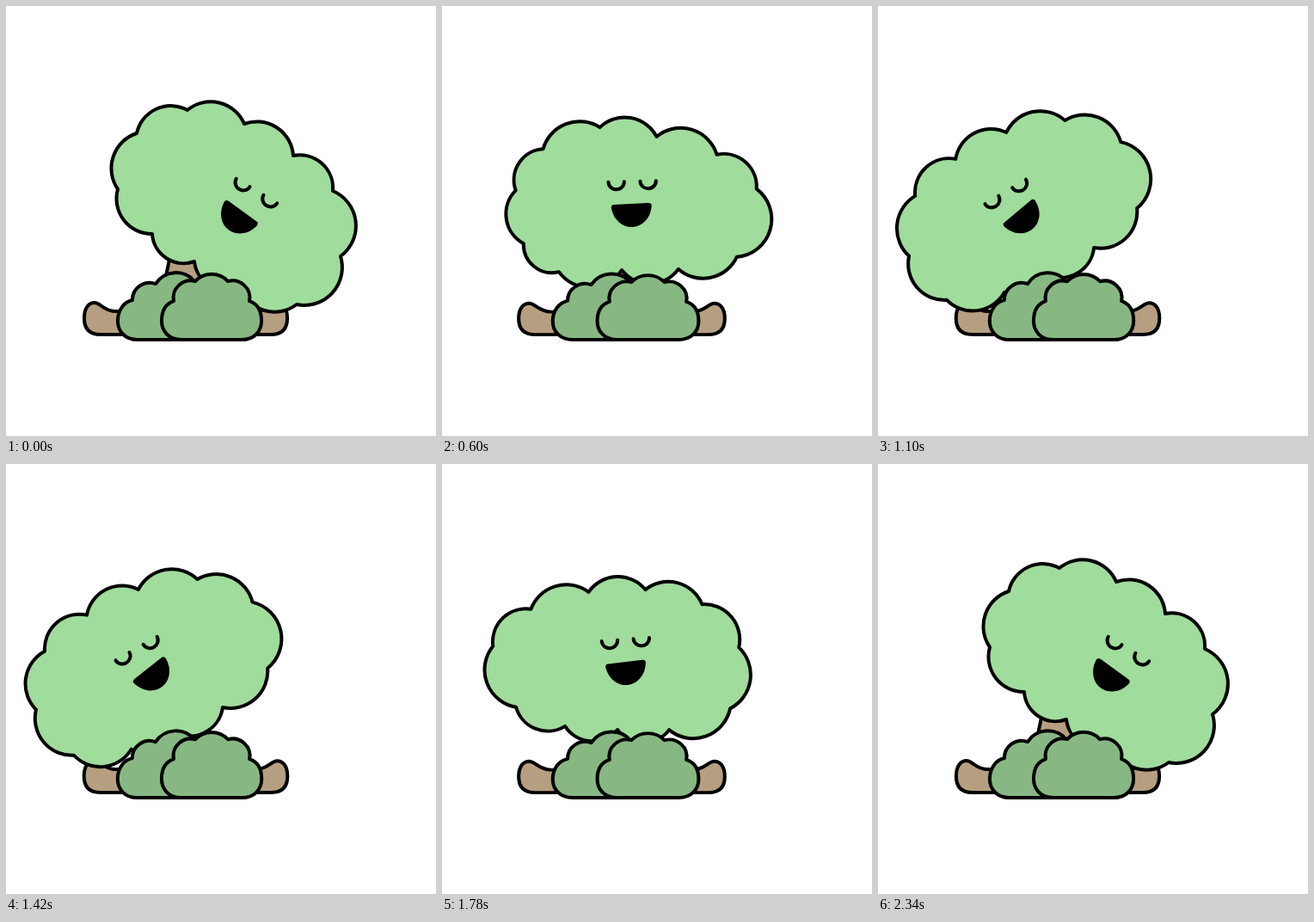
Recreate the animation shown at these times as an HTML page. Size 500 by 500 pixels, loop 2.36 s.

```html
<!DOCTYPE html>
<html lang="en">
<head>
<meta charset="utf-8">
<title>Swaying tree</title>
<style>
  html, body { margin: 0; width: 100%; height: 100%; overflow: hidden; background: #fff; }
  svg { display: block; width: 100%; height: 100%; }
  .line { stroke: #000; stroke-width: 4; stroke-linejoin: round; stroke-linecap: round; }
  .wood { fill: #b59f80; }
  .crown { fill: #a0dc9c; }
  .bush { fill: #87b883; }
  .eyes { fill: none; }
  .mouth { stroke: #000; stroke-width: 7; stroke-linejoin: round; }
</style>
</head>
<body>
<svg viewBox="0 0 500 500">
  <g class="squash">
    <path class="line wood" d="M209 382H110C97 382 91 375 91 363C91 350 97 345 103 345C110 345 114 355 128 355H165C181 352 184 330 186 314L192 285H226L232 314C234 330 237 352 253 355H290C304 355 308 345 315 345C321 345 327 350 327 363C327 375 321 382 308 382Z"/>
  </g>
  <path class="line crown" id="crown"/>
  <path class="line eyes" id="eyes" d="M-27.7 0A9.2 8.8 0 0 0-9.3 0M9.3 0A9.2 8.8 0 0 0 27.7 0"/>
  <path class="mouth" id="mouth" d="M-20-10H20C18 3 9 10 0 10S-18 3-20-10Z"/>
  <g class="squash">
    <path class="line bush" d="M153 388C138 388 130 378 130 366C130 354 137 344 147 342A20 20 0 0 1 174 323A28 28 0 0 1 219 320L240 388Z"/>
    <path class="line bush" d="M204 388H274C289 388 297 378 297 366C297 354 292 346 283 343A20 20 0 0 0 258 320A26 26 0 0 0 220 320A20 20 0 0 0 195 343C186 346 181 354 181 366C181 378 189 388 204 388Z"/>
  </g>
</svg>
<script>
  const HALF = 1180;
  const $ = id => document.getElementById(id);
  const squashed = document.querySelectorAll('.squash');

  // crown: notches clockwise; eyes and mouth: x, y, angle
  const right = {
    crown: [211,121, 277,137, 334,174, 380,215, 389,291, 338,347, 272,328, 219,297, 170,265, 130,213, 152,148],
    eyes: [291.5, 215, 31], mouth: [267, 249.5, 36]
  };
  const toLeft = {
    crown: [118,166, 184,141, 250,152, 320,173, 366,213, 343,292, 275,306, 209,307, 136,309, 95,276, 86,214],
    eyes: [221.5, 204, -1.5], mouth: [221, 243.5, -2.5]
  };
  const left = {
    crown: [43,221, 90,178, 149,147, 217,133, 282,158, 301,235, 251,281, 198,313, 147,333, 80,342, 36,291],
    eyes: [148, 216, -31], mouth: [171, 249, -40]
  };
  const toRight = {
    crown: [103,169, 170,149, 236,146, 302,163, 345,213, 335,284, 264,309, 204,309, 143,305, 86,283, 59,212],
    eyes: [213, 204, -4.5], mouth: [214.5, 243.5, -7]
  };

  const ease = x => x < .5 ? 4 * x ** 3 : 1 - 4 * (1 - x) ** 3;
  const MID = ease(600 / HALF);

  // Quadratic curve through three poses
  function blend(a, b, c, p) {
    const wa = (p - MID) * (p - 1) / MID;
    const wb = p * (p - 1) / (MID * (MID - 1));
    const wc = p * (p - MID) / (1 - MID);
    return a.map((v, i) => v * wa + b[i] * wb + c[i] * wc);
  }

  function cloud(v) {
    let d = `M${v[0]} ${v[1]}`;
    for (let i = 0; i < v.length; i += 2) {
      const j = (i + 2) % v.length;
      const chord = Math.hypot(v[j] - v[i], v[j + 1] - v[i + 1]);
      const r = Math.min(chord * .625, 44);
      d += `A${r} ${r} 0 0 1 ${v[j]} ${v[j + 1]}`;
    }
    return d + 'Z';
  }

  function draw(t) {
    const goingLeft = t < HALF;
    const poses = goingLeft ? [right, toLeft, left] : [left, toRight, right];
    const p = ease(t % HALF / HALF);
    const at = part => blend(...poses.map(pose => pose[part]), p);

    $('crown').setAttribute('d', cloud(at('crown')));
    for (const part of ['eyes', 'mouth']) {
      const [x, y, angle] = at(part);
      $(part).setAttribute('transform', `translate(${x} ${y}) rotate(${angle})`);
    }

    const s = Math.sin(Math.PI * (t - 80) / HALF) ** 2;
    const squash = `translate(209 389) scale(${1 + .016 * s} ${1 - .018 * s}) translate(-209 -389)`;
    squashed.forEach(g => g.setAttribute('transform', squash));
  }

  const start = performance.now();
  function tick() {
    draw((performance.now() - start) % (2 * HALF));
    requestAnimationFrame(tick);
  }
  tick();
</script>
</body>
</html>
```
